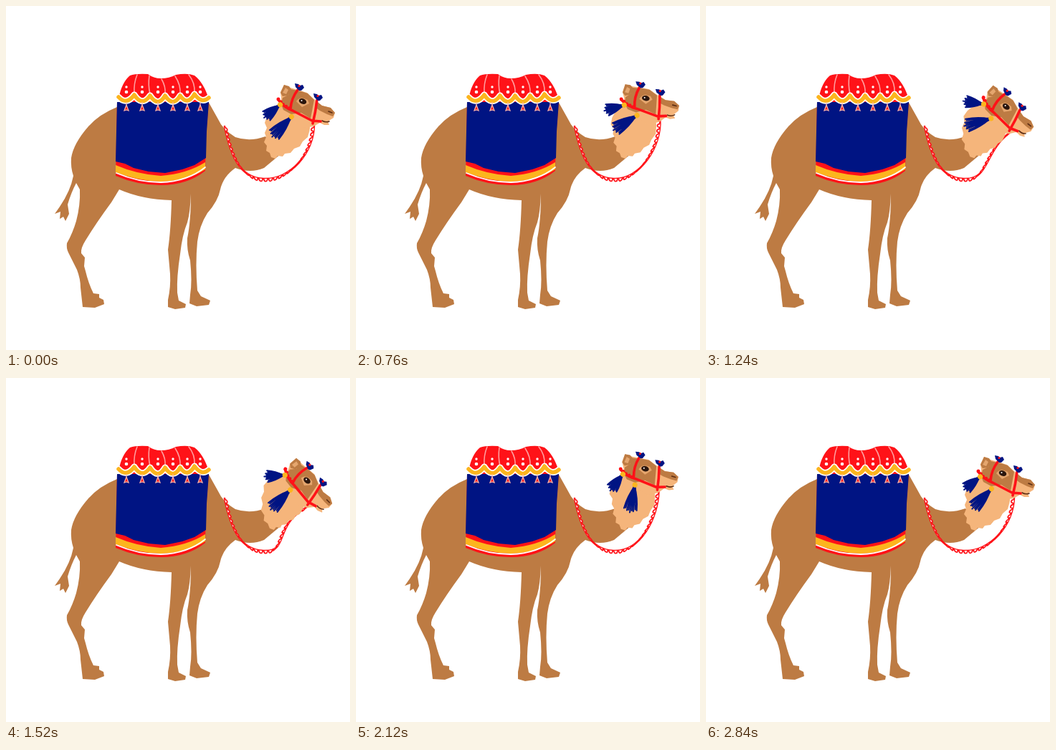
Write an HTML page that moves like this. It is 480x480 px and loops after 2.88 s.

```html
<!DOCTYPE html>
<html lang="en">
<head>
<meta charset="utf-8">
<title>Camel</title>
<style>
  html, body { margin: 0; width: 100%; height: 100%; overflow: hidden; background: #fff; }
  svg { display: block; width: 100vw; height: 100vh; }
  .coat { fill: #bd7b43; }
  .fur { fill: #f5b57b; }
  .red { fill: #ff1218; }
  .navy { fill: #001483; }
  .gold { fill: #fcb51e; }
  .line { fill: none; stroke-linecap: round; stroke-linejoin: round; }
  .strap { stroke: #ff1218; stroke-width: 3.6; }
  .thread { stroke: #001483; stroke-width: 2; }
</style>
</head>
<body>
<svg viewBox="0 0 480 480">
  <path class="coat" d="M155 141Q130 151 115 168Q94 192 91 212Q90 225 94 237Q90 258 75 280L68 290L76 287L75 297L80 294L83 300L88 290L86 277Q91 260 98 247L103 256Q104 277 98 300Q93 317 85 331Q84 338 87 344L99 368Q104 381 104 393L107 420L124 421L137 416L136 410L130 407L130 402L122 401Q115 387 111 370L109 363L110 351L105 345Q104 338 111 327Q127 301 147 274L158 256Q190 270 231 271Q230 313 226 340L229 374Q230 392 226 410L226 420L236 423L250 421L251 416L241 411L239 400Q238 378 243 346Q246 319 253 302Q257 288 258 262Q258 300 253 324Q252 340 257 355Q260 385 257 403L256 415L266 419L283 417L285 411L272 405L267 397Q264 360 267 329Q270 306 281 289Q296 272 299 256Q303 238 320 226Q341 234 360 226L384 206L362 182Q340 190 320 183Q302 172 296 158L282 133L260 110H180Z"/>

  <path class="red" d="M155 134L153 237Q183 250 216 250Q253 250 278 230L279 182L283 134Z"/>
  <path class="gold" d="M153 222Q183 235 216 237Q253 234 278 218V228Q253 244 216 245Q183 244 153 232Z"/>
  <path class="navy" d="M155 134L153 217L166 220L178 226L199 231L222 233L246 228L263 222L279 212L280 175L283 134Z"/>
  <path class="line" stroke="#fff" stroke-width="1.8" d="M154 233Q184 246 216 246Q253 245 278 225"/>

  <path class="red" d="M157 130Q161 107 173 97Q181 94 198 95Q206 101 216 101Q228 101 237 96Q253 93 263 97Q276 107 283 130L270 134H168Z"/>
  <path class="line" stroke="#ff9d9d" stroke-width="1.6" d="M183 96Q178 108 179 122M200 97Q198 110 201 123M217 102Q223 112 222 123M236 98Q244 110 243 123M255 96Q264 107 263 121"/>
  <g id="fringe"></g>

  <path id="rein" class="line" stroke="#ff1218" stroke-width="2.6"/>
  <path id="loops" fill="#fff" stroke="#ff1218" stroke-width="1.7"/>

  <path id="mane" class="fur"/>
  <g id="head">
    <path class="fur" d="M384 129L383 120L388 110L397 114L420 121L430 130L441 139L453 142L459 149L457 156L449 161L451 166L444 166L438 163L429 168L414 170L396 157L384 143Z"/>
    <path class="coat" d="M386 128L394 124L397 116L412 119L421 122L430 131L425 157L412 149L398 151L387 145L384 137Z"/>
    <path class="coat" d="M432 132L441 139L453 142L459 149L456 154L448 151L438 146L431 141Z"/>
    <path class="coat" d="M383 121L388 110L395 112L399 118L393 125L386 126Z"/>
    <path fill="#e5a66e" d="M386 121L390 114L394 117L391 123Z"/>
    <path fill="#e5a66e" d="M405 133Q410 125 421 131L423 136L413 141Z"/>
    <ellipse cx="414" cy="133" rx="5.4" ry="3.7" fill="#2b160d" transform="rotate(18 414 133)"/>
    <circle cx="412.5" cy="132" r="1" fill="#fff"/>
    <path class="line" stroke="#5b2c12" stroke-width="1.6" d="M450 147L455 149M441 160Q446 163 451 161"/>
    <path class="line strap" d="M407 117Q398 129 397 143M380 131Q387 141 400 146L427 160L439 161M434 131Q432 148 428 164"/>
    <path class="line" stroke="#ff1218" stroke-width="5" stroke-dasharray="0 5" d="M380 130L387 138L397 144"/>
    <g id="bow">
      <path class="navy" d="M409 118L404 113L403 108L408 109L410 111L414 110L416 114L412 118Z"/>
      <circle class="red" cx="409" cy="111.5" r="1.6"/>
    </g>
    <use href="#bow" x="26" y="14"/>
  </g>
  <g id="tassels"></g>
</svg>
<script>
const $ = id => document.getElementById(id);
const EYE = [414, 133];
const LOOP = 2880, STEP = 40;

// time, eye x, eye y, tilt, left tassel, right tassel, rein control x, y
const KEYS = [
  [0,    414, 133,   0,  51, 44, 430, 205],
  [480,  393, 122, -20,  31,  5, 440, 190],
  [960,  414, 135,   5, 100, 90, 412, 200],
  [1520, 420, 143,  23,  86, 45, 372, 205],
  [1840, 401, 126,  -2,  32,  6, 408, 200],
  [2360, 407, 128,  -5,  45, 19, 428, 195],
  [2840, 414, 133,   0,  51, 44, 430, 205],
  [2880, 414, 133,   0,  51, 44, 430, 205]
];

// x, y, share of the head movement
const MANE = [
  [385, 137, 1], [372, 143, 1], [364, 154, 1], [361, 163, 1], [364, 170, .9],
  [361, 177, .7], [363, 183, .5], [360, 190, .35], [364, 195, .25], [363, 202, .2],
  [368, 205, .15], [370, 211, .1], [376, 213, .1], [379, 209, .1], [386, 210, .15],
  [389, 206, .2], [397, 205, .3], [402, 199, .4], [410, 196, .5], [414, 189, .6],
  [421, 183, .8], [424, 172, 1], [424, 160, 1], [405, 145, 1]
];

function slope(i, c) {
  const a = KEYS[i - 1], b = KEYS[i], d = KEYS[i + 1];
  if (!a || !d || (b[c] - a[c]) * (d[c] - b[c]) <= 0) return 0;
  return (d[c] - a[c]) / (d[0] - a[0]);
}

function pose(t) {
  const i = KEYS.findIndex((k, n) => n && t < k[0]) - 1;
  const a = KEYS[i], b = KEYS[i + 1], h = b[0] - a[0], u = (t - a[0]) / h;
  const ease = u * u * (3 - 2 * u);
  return a.slice(1).map((v, n) => {
    const c = n + 1;
    return v + (b[c] - v) * ease
      + h * u * (1 - u) * ((1 - u) * slope(i, c) - u * slope(i + 1, c));
  });
}

function buildFringe() {
  const edge = 'M157 127Q168 139 179 124Q190 141 201 125Q212 142 222 125Q233 142 243 125Q253 140 263 123Q273 137 283 128';
  const band = (color, width) =>
    `<path class="line" d="${edge}" stroke="${color}" stroke-width="${width}"/>`;
  let out = band('#fff', 9) + band('#fcb51e', 5.5);
  [168, 190, 212, 233, 253, 271].forEach((x, i) => {
    out += `<circle cx="${x}" cy="113" r="1.7" fill="#fff"/>
      <circle cx="${x}" cy="120" r="2.3" fill="#fff"/>
      <path d="M${x} 134v4l-3 8 3 -1 3 1-3 -8" fill="#ff1218" stroke="#ffb3a8" stroke-width="1.3"/>`;
  });
  $('fringe').innerHTML = out;
}

function tassel(length, spread) {
  let d = '';
  for (let i = -4; i <= 4; i++) {
    const x = i * spread / 4, y = length - Math.abs(i) * 1.1 - (i & 1) * 2;
    d += `M0 0Q${x * .8} ${length * .4} ${x} ${y}`;
  }
  return `<g><path class="line thread" d="${d}"/>
    <path class="navy" d="M-2 0L${-spread * .65} ${length * .6}H${spread * .65}L2 0Z"/>
    <circle class="gold" r="3.6" cy="-2"/></g>`;
}

buildFringe();
$('tassels').innerHTML = tassel(27, 8) + tassel(37, 9);
const [left, right] = $('tassels').children;

function drawRein(end, cx, cy) {
  const rein = $('rein');
  rein.setAttribute('d',
    `M305 168C312 202 324 241 360 241C396 243 ${cx} ${cy} ${end}`);
  const total = rein.getTotalLength();
  let d = '';
  for (let s = 4; s < total - 3; s += 7) {
    const p = rein.getPointAtLength(s - 2.5), q = rein.getPointAtLength(s + 2.5);
    // loops hang on the outer side of the cord
    const side = s < total * .36 ? .8 : 1;
    const nx = -(q.y - p.y) * -side, ny = (q.x - p.x) * side;
    d += `M${p.x} ${p.y}C${p.x - nx * -1} ${p.y + ny} ${q.x + nx} ${q.y + ny} ${q.x} ${q.y}`;
  }
  $('loops').setAttribute('d', d);
}

function draw(t) {
  const [x, y, tilt, swingL, swingR, cx, cy] = pose(t);
  const r = tilt * Math.PI / 180, c = Math.cos(r), s = Math.sin(r);
  const move = (px, py) => {
    const dx = px - EYE[0], dy = py - EYE[1];
    return [x + dx * c - dy * s, y + dx * s + dy * c];
  };
  $('head').setAttribute('transform',
    `translate(${x} ${y}) rotate(${tilt}) translate(${-EYE[0]} ${-EYE[1]})`);
  $('mane').setAttribute('d', 'M' + MANE.map(([px, py, w]) => {
    const [mx, my] = move(px, py);
    return [px + (mx - px) * w, py + (my - py) * w];
  }).join('L') + 'Z');
  left.setAttribute('transform', `translate(${move(381, 139)}) rotate(${swingL})`);
  right.setAttribute('transform', `translate(${move(397, 156)}) rotate(${swingR})`);
  drawRein(move(430, 165), cx, cy);
}

function tick() {
  const t = Math.floor(performance.now() % LOOP / STEP) * STEP;
  draw(t < 80 ? 0 : t);
  requestAnimationFrame(tick);
}
tick();
</script>
</body>
</html>
```
